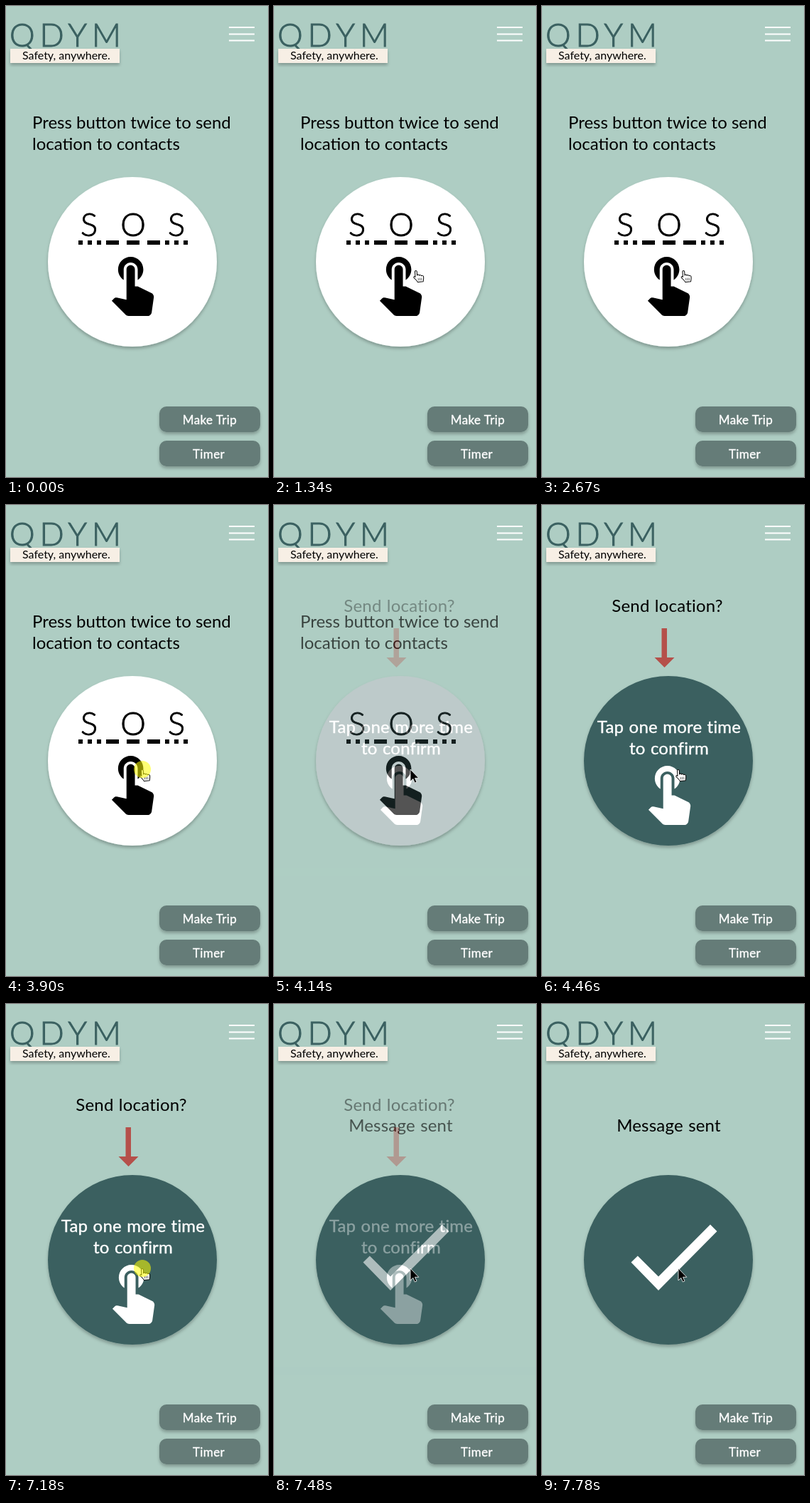
Write an HTML page that moves like this. It is 369 by 661 pixels and loops after 8 s.

```html
<!DOCTYPE html>
<html lang="en">
<head>
<meta charset="utf-8">
<title>Safety app</title>
<style>
  html, body { margin: 0; width: 100%; height: 100%; overflow: hidden; background: #aecdc3; }
  svg { display: block; width: 369px; height: 661px; }
  text { font-family: Lato, "Open Sans", sans-serif; }
  .copy { font-size: 24px; }
  .mid { text-anchor: middle; letter-spacing: .2px; word-spacing: 1px; }
  .white { fill: #fff; stroke: #fff; stroke-width: .4px; }
  .logo { font-size: 45px; font-weight: 300; letter-spacing: 7px; fill: #3a6060; stroke: #3a6060; }
  .sos { font-size: 45px; font-weight: 300; text-anchor: middle; stroke: #000; stroke-width: .9px; }
  .button { font-size: 17px; letter-spacing: .4px; text-anchor: middle; }
</style>
</head>
<body>
<svg viewBox="0 0 369 661">
  <defs>
    <filter id="shadow" x="-10%" y="-20%" width="120%" height="150%">
      <feDropShadow dx="0" dy="3" stdDeviation="2" flood-opacity=".25"/>
    </filter>
    <path id="tap" transform="translate(130.2 340.15) scale(3.95)" d="M9 11.24V7.5C9 6.12 10.12 5 11.5 5S14 6.12 14 7.5v3.74c1.21-.81 2-2.18 2-3.74C16 5.01 13.99 3 11.5 3S7 5.01 7 7.5c0 1.56.79 2.93 2 3.74zm9.84 4.63l-4.54-2.26c-.17-.07-.35-.11-.54-.11H13v-6c0-.83-.67-1.5-1.5-1.5S10 6.67 10 7.5v10.74l-3.43-.72c-.08-.01-.15-.03-.24-.03-.31 0-.59.13-.79.33l-.79.8 4.94 4.94c.27.27.65.44 1.06.44h6.79c.75 0 1.33-.55 1.44-1.28l.75-5.27c.01-.07.02-.14.02-.2 0-.62-.38-1.16-.91-1.38z"/>
    <rect id="backdrop" y="100" width="369" height="420" fill="#aecdc3"/>
    <circle id="disc" cx="178" cy="359" r="119" filter="url(#shadow)"/>
  </defs>

  <rect width="369" height="661" fill="#aecdc3"/>
  <text class="logo" x="5" y="57">QDYM</text>
  <rect x="6" y="60" width="154" height="20" fill="#f7efe5" filter="url(#shadow)"/>
  <text x="23" y="75" font-size="16">Safety, anywhere.</text>
  <path d="M314 30h36M314 39.500h36M314 48.500h36" stroke="#fff" stroke-width="2"/>

  <g id="press">
    <text class="copy" x="37" y="172">Press button twice to send</text>
    <text class="copy" x="37" y="202">location to contacts</text>
    <use href="#disc" fill="#fff"/>
    <text class="sos" x="117" y="323">S</text>
    <text class="sos" x="179" y="323">O</text>
    <text class="sos" x="240" y="323">S</text>
    <path d="M102 332h6m7 0h6m7 0h6m7 0h18m11 0h18m11 0h18m7 0h6m7 0h6m7 0h6" stroke="#000" stroke-width="6"/>
    <use href="#tap"/>
  </g>

  <g id="confirm">
    <use href="#backdrop"/>
    <text class="copy mid" x="176.500" y="150">Send location?</text>
    <path d="M168.500 173h7.500v41h10.500L172.500 228 158.500 214h10z" fill="#b5504a"/>
    <use href="#disc" fill="#3a6060"/>
    <text class="copy mid white" x="179" y="320">Tap one more time</text>
    <text class="copy mid white" x="179" y="350">to confirm</text>
    <use href="#tap" x="1" y="14" fill="#fff"/>
  </g>

  <g id="sent">
    <use href="#backdrop"/>
    <text class="copy mid" x="178.500" y="179">Message sent</text>
    <use href="#disc" fill="#3a6060"/>
    <path d="M125.500 362.500 134.800 353.500 164 382.500 237 309.500 246.500 319 164 402z" fill="#fff"/>
  </g>

  <g fill="#657c78">
    <rect x="216" y="562" width="142" height="36" rx="10" filter="url(#shadow)"/>
    <rect x="216" y="610" width="142" height="36" rx="10" filter="url(#shadow)"/>
  </g>
  <text class="button white" x="287" y="587">Make Trip</text>
  <text class="button white" x="285.500" y="635">Timer</text>

  <g id="cursor">
    <path id="arrow" d="M0 0V17L3.800 13.300 6.300 19 9 17.800 6.500 12.300H11.800Z" stroke="#fff" stroke-width=".8"/>
    <g id="hand" transform="translate(0 1) rotate(-4)" fill="#fff" stroke="#000" stroke-linejoin="round">
      <path d="M-1.600 .8C-1.600-.8 1.200-.8 1.200 .8V6C1.600 4.900 4.100 5.100 4.200 6.400 5 5.600 6.900 6 7.100 7.200 8 6.500 9.900 7 10 8.400 10.300 12 9.600 13 9 15.500H1.200C.3 13-2.800 10.500-3.800 8.700-4 7.200-2.600 7-1.600 8.200Z"/>
      <path d="M2.500 10v3.500M4.800 10v3.500M7 10v3.500" stroke-width=".6"/>
    </g>
  </g>
  <circle id="click" cx="192" cy="371" r="12" fill="#ff0" fill-opacity=".55"/>
</svg>
<script>
const LOOP = 8000, TICK = 78;
const CONFIRM_AT = 4062, SENT_AT = 7318;
const part = id => document.getElementById(id);
const [confirmScreen, sentScreen, cursor, arrow, hand, click] =
  ['confirm', 'sent', 'cursor', 'arrow', 'hand', 'click'].map(part);

const moves = [
  { start: 70, end: 560, steps: 8, to: [226, 407] },
  { start: 960, end: 1340, steps: 6, to: [200, 371] },
  { start: 2670, end: 2980, steps: 5, to: [194, 371] },
  { start: 3210, end: 3300, steps: 2, to: [192, 371] }
];

const ease = u => (1 - Math.cos(Math.PI * u)) / 2;
const within = (t, a, b) => t >= a && t < b;
const show = (el, on) => el.setAttribute('display', on ? 'inline' : 'none');

function cursorAt(t) {
  let pos = [253, 668];
  for (const { start, end, steps, to } of moves) {
    if (t < start) break;
    const step = Math.min(steps, Math.floor((t - start) / (end - start) * (steps - 1)) + 1);
    const u = ease(step / steps);
    pos = pos.map((v, i) => v + (to[i] - v) * u);
  }
  return pos;
}

function dissolve(t, start) {
  if (t < start) return 0;
  return Math.min(1, .07 + .26 * Math.floor((t - start) / TICK));
}

function usesHand(t, [x, y]) {
  if (within(t, CONFIRM_AT, CONFIRM_AT + 5 * TICK) || t >= SENT_AT) return false;
  const onDisc = Math.hypot(x - 178, y - 359) < 119;
  const onButton = x > 216 && x < 358 && (within(y, 562, 598) || within(y, 610, 646));
  return onDisc || onButton;
}

function render(t) {
  const pos = cursorAt(t), pointing = usesHand(t, pos);
  confirmScreen.setAttribute('opacity', dissolve(t, CONFIRM_AT));
  sentScreen.setAttribute('opacity', dissolve(t, SENT_AT));
  cursor.setAttribute('transform', `translate(${pos})`);
  show(cursor, t >= 70);
  show(hand, pointing);
  show(arrow, !pointing);
  show(click, within(t, 3900, CONFIRM_AT) || within(t, 7180, SENT_AT));
}

const began = performance.now();
function frame() {
  render((performance.now() - began) % LOOP);
  requestAnimationFrame(frame);
}
frame();
</script>
</body>
</html>
```
